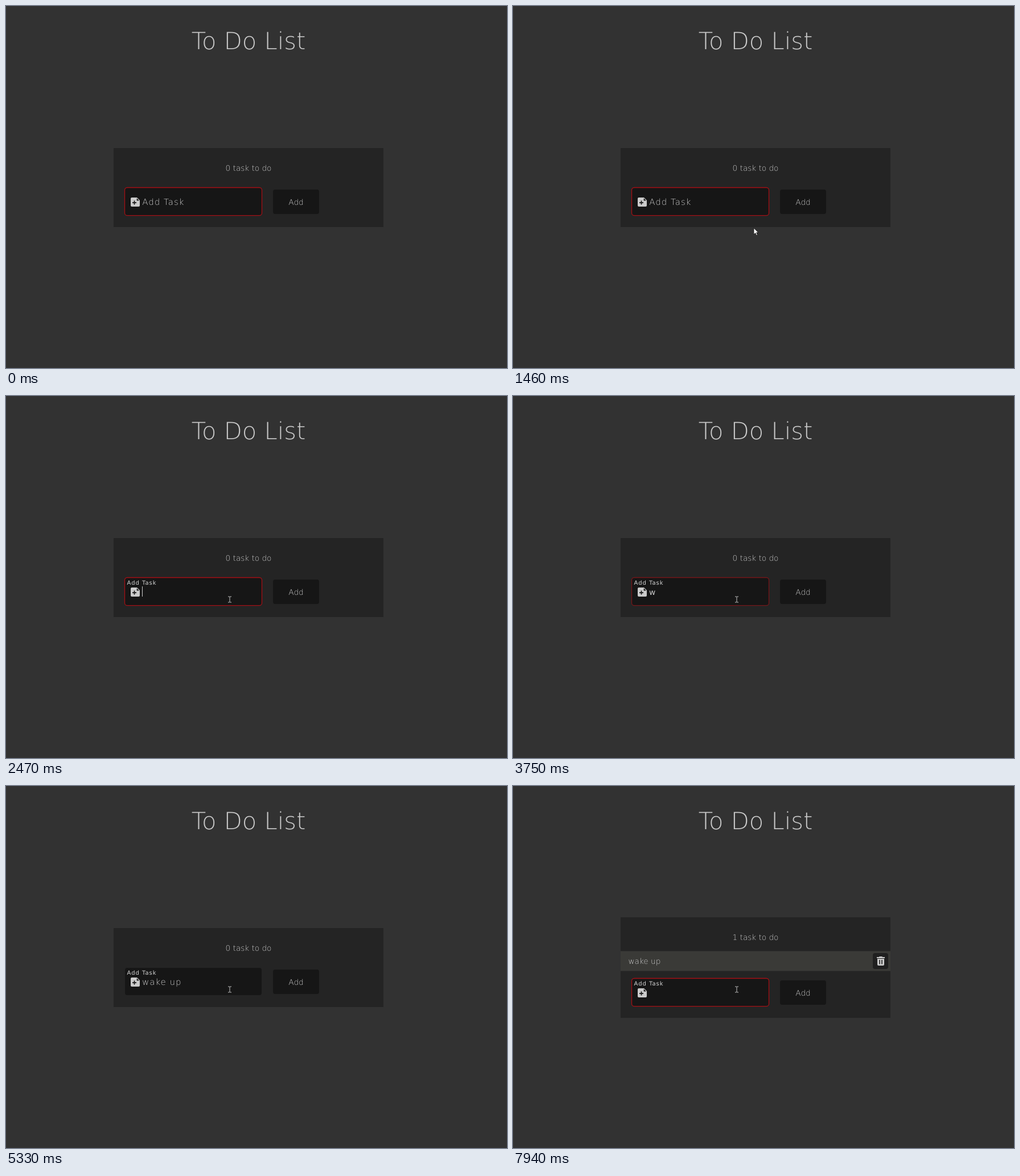
Recreate the animation shown at these times as an HTML page. Size 880 by 637 pixels, loop 8000 ms.

```html
<!DOCTYPE html>
<html lang="en">
<head>
<meta charset="utf-8">
<title>To Do List</title>
<style>
  html, body { margin: 0; width: 100%; height: 100%; overflow: hidden; background: #323232; }
  svg { display: block; width: 880px; height: 637px; }
  text {
    font: 200 13.6px "DejaVu Sans", sans-serif;
    fill: #cacaca;
    white-space: pre;
    text-rendering: geometricPrecision;
  }
  #title { font-size: 41.6px; }
  #label, #typed { letter-spacing: 1px; }
  .mid { text-anchor: middle; }
  .dark { fill: #161616; }
  .icon { fill: #cbcbcb; }
</style>
</head>
<body>
<svg viewBox="0 0 880 637">
  <rect width="880" height="637" fill="#323232"/>
  <text id="title" class="mid" x="426" y="76">To Do List</text>

  <rect id="panel" x="189" width="474" fill="#242424"/>
  <text id="count" class="mid" x="426"></text>

  <g id="row">
    <rect x="189" y="290.5" width="474" height="35" fill="#3a3a37"/>
    <text x="202.5" y="313">wake up</text>
    <rect x="632" y="294" width="27" height="28" rx="4" fill="#202020"/>
    <path class="icon" d="M639 301h3.8l1-1h4.4l1 1h3.8v2h-14zM640 304h12v10q0 2-2 2h-8q-2 0-2-2z"/>
    <path d="M644 306v7.5M648 306v7.5" stroke="#202020" stroke-width="1.6"/>
  </g>

  <g id="form">
    <rect class="dark" x="209" y="320" width="240" height="48" rx="4"/>
    <rect id="border" x="208.5" y="319.5" width="241" height="49.2" rx="4.5"
          fill="none" stroke="#a30f14" stroke-width="1.3"/>
    <path class="icon" d="M221 337h9l5 5v9q0 2-2 2h-12q-2 0-2-2v-12q0-2 2-2z"/>
    <path d="M225.5 342.6v7M222 346.1h7" stroke="#161616" stroke-width="1.7"/>
    <path d="M229.7 338.2v4.2h4.2z" fill="#161616"/>
    <text id="label">Add Task</text>
    <text id="typed" x="239" y="350"></text>
    <rect id="caret" y="335" width="1" height="18" fill="#cacaca"/>
    <rect class="dark" x="469" y="323" width="81" height="43" rx="4"/>
    <text class="mid" x="509.5" y="350">Add</text>
  </g>

  <circle id="click" cx="391.2" cy="357.5" r="10.2" fill="#85850c"/>
  <path id="arrow" d="M0 0v11.2l2.7-2.5 1.8 4.1 1.9-.8-1.8-4h3.4z"
        fill="#fff" stroke="#151515" stroke-width=".8"/>
  <path id="beam" d="M-3-5h2.2l.8.7.8-.7H3M-3 5h2.2l.8-.7.8.7H3M0-4.3v8.6"
        fill="none" stroke="#c4c4c4"/>
</svg>
<script>
const LOOP = 8000, ADDED = 5520, TYPING = 3670;
const $ = id => document.getElementById(id);

// time, x, y
const pointer = [
  [370, 867, 630], [500, 752, 592], [640, 673, 567], [900, 666, 565], [1020, 536, 521],
  [1140, 480, 463], [1300, 440, 414], [1480, 421, 388], [1680, 411, 376],
  [1740, 402, 367], [1830, 393, 358]
];
// time, field text
const typing = [
  [0, ''], [TYPING, 'w'], [3850, 'wa'], [3990, 'wak'], [4130, 'wake'],
  [4270, 'wake '], [5080, 'wake u'], [5250, 'wake up'], [ADDED, '']
];
// time, caret x (0 = hidden)
const carets = [
  [0, 0], [2200, 239], [2710, 0], [3220, 239], [TYPING, 0], [4480, 288], [4790, 0],
  [5080, 298], [5250, 309], [5330, 0], [ADDED, 239], [5860, 0], [6370, 239],
  [6880, 0], [7400, 239], [7940, 0]
];

const mix = (a, b, k) => a + (b - a) * k;
const held = (table, t) => table.filter(s => s[0] <= t).pop()[1];

function ramp(t, start, length) {
  const k = Math.min(1, Math.max(0, (t - start) / length));
  return 1 - (1 - k) ** 2 * (1 - k * 0.2);
}

function along(t) {
  const i = pointer.findIndex(p => p[0] > t);
  if (i < 0) return pointer[pointer.length - 1].slice(1);
  const [a, b] = [pointer[i - 1], pointer[i]];
  const k = (t - a[0]) / (b[0] - a[0]);
  return [mix(a[1], b[1], k), mix(a[2], b[2], k)];
}

function show(id, on) {
  $(id).style.visibility = on ? 'visible' : 'hidden';
}

function place(id, x, y) {
  $(id).setAttribute('transform', `translate(${x} ${y})`);
}

function drawPointer(t) {
  const inside = t >= 1740;
  show('arrow', t >= 370 && !inside);
  show('beam', inside);
  show('click', t >= 2140 && t < 2260);
  if (t >= 370) place(inside ? 'beam' : 'arrow', ...along(t));
}

function drawLayout(t) {
  const added = t >= ADDED, grow = added ? 19 : 0;
  $('panel').setAttribute('y', 250 - grow);
  $('panel').setAttribute('height', 139 + 2 * grow);
  $('count').setAttribute('y', 290 - grow);
  $('count').textContent = `${+added} task to do`;
  show('row', added);
  place('form', 0, grow);
}

function drawField(t) {
  const lift = ramp(t, 2170, 300), label = $('label');
  label.setAttribute('x', mix(239.3, 212.5, lift));
  label.setAttribute('y', mix(350, 332, lift));
  label.style.fontSize = mix(15, 10, lift) + 'px';
  label.style.fontWeight = lift > 0.5 ? 400 : 200;
  label.style.fill = lift > 0.5 ? '#d6d6d6' : '#cacaca';

  const valid = ramp(t, TYPING, 450), typed = $('typed');
  typed.textContent = held(typing, t);
  typed.style.fontSize = mix(13.1, 15, valid) + 'px';
  typed.style.fontWeight = valid > 0.6 ? 200 : 400;
  $('border').style.opacity = t < ADDED ? 1 - valid : ramp(t, ADDED, 370);

  const x = held(carets, t);
  $('caret').setAttribute('x', x);
  show('caret', x > 0);
}

function frame() {
  const t = performance.now() % LOOP;
  drawPointer(t);
  drawLayout(t);
  drawField(t);
  requestAnimationFrame(frame);
}
frame();
</script>
</body>
</html>
```
